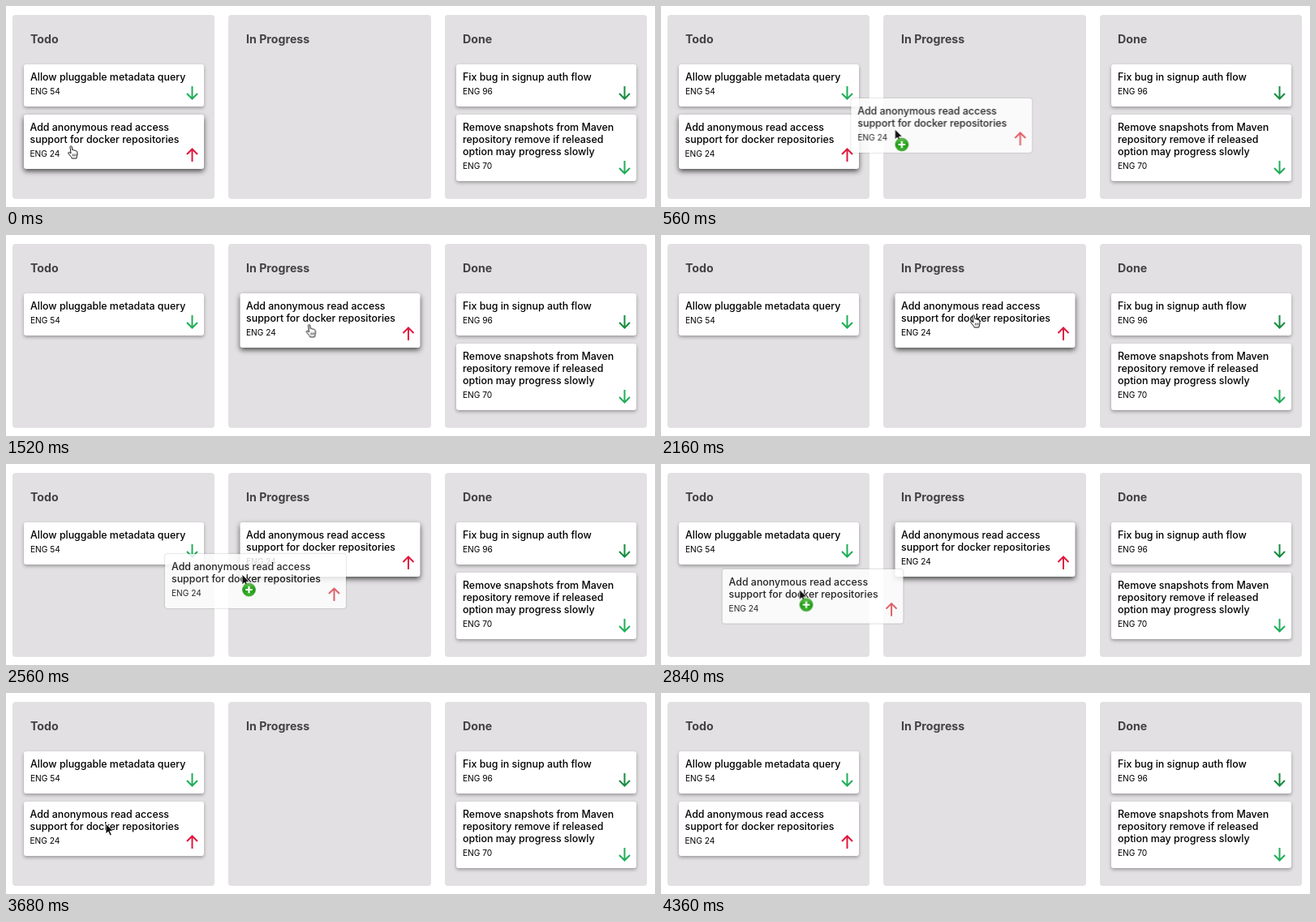
Recreate the animation shown at these times as an HTML page. Size 800 by 248 pixels, loop 4.4 s.

```html
<!DOCTYPE html>
<html lang="en">
<head>
<meta charset="utf-8">
<title>Task board</title>
<style>
html, body { margin: 0; width: 100%; height: 100%; overflow: hidden; background: #fff; }
body { position: relative; font-family: Inter, "Noto Sans", sans-serif; color: #000; }
.column, .card, .pointer, .pointer > *, h2, .card svg { position: absolute; }
.column { top: 11px; width: 249px; height: 227px; border-radius: 4px; background: #e2e0e2; }
h2 { left: 22px; top: 21.4px; margin: 0; font-size: 14.2px; line-height: 17px; font-weight: 650; color: #444244; }

.card {
  box-sizing: border-box; width: 221.5px; height: calc(37px + 15px * var(--lines));
  padding: 8px; border-radius: 3px; background: #fff; white-space: nowrap;
  font-size: 12.4px; line-height: 15px; font-weight: 500;
  box-shadow: 0 2px 4px rgba(0, 0, 0, .32);
}
.card small { display: block; margin-top: 4.3px; font-size: 10.2px; line-height: 12px; font-weight: 400; }
.card svg { right: 7px; bottom: 8px; width: 16px; height: 18px; fill: none; stroke: #1fae58; stroke-width: 2; }
.card .dark { stroke: #178c40; }
.card .high { stroke: #e0183f; }

.task, .ghost { width: 222.5px; }
.task { left: 21.5px; top: 134px; animation: place 4.4s step-end infinite, hover 4.4s step-end infinite; }
.pointer { left: 0; top: 0; animation: travel 4.4s linear infinite; }
.pointer > svg { left: 0; top: 0; overflow: visible; }
.ghost { left: 0; top: 0; box-shadow: 0 0 2px rgba(0, 0, 0, .4); animation: ghost 4.4s step-end infinite; }
.ghost .high { stroke: #e2454f; }
.hand { animation: hand 4.4s step-end infinite; }
.arrow { animation: arrow 4.4s step-end infinite; }
.plus { animation: plus 4.4s step-end infinite; }

@keyframes place {
  0%, 78.18%, 100% { transform: none; }
  19.09% { transform: translate(266.5px, -62px); }
}
@keyframes hover {
  0%, 28.18% { box-shadow: 0 3px 6px rgba(0, 0, 0, .65); }
  19.09%, 78.18%, 100% { box-shadow: 0 2px 4px rgba(0, 0, 0, .32); }
}
@keyframes travel {
  0%, 2.73% { transform: translate(76px, 172px); animation-timing-function: ease-in-out; }
  12.73% { transform: translate(288px, 152px); animation-timing-function: ease-out; }
  17.27%, 27.27% { transform: translate(338px, 142px); animation-timing-function: ease-in-out; }
  38.64%, 50.45% { transform: translate(381px, 98px); animation-timing-function: ease-in; }
  58.18% { transform: translate(291.5px, 136px); }
  63.64% { transform: translate(178px, 153px); animation-timing-function: ease-out; }
  72.73% { transform: translate(132.5px, 163px); }
  76.36%, 100% { transform: translate(123px, 161px); }
}
@keyframes ghost {
  0%, 19.09%, 78.18%, 100% { opacity: 0; }
  2.73% { opacity: .83; transform: translate(-54px, -38px); }
  50.91% { opacity: .83; transform: translate(-95px, -25px); }
}
@keyframes hand {
  0%, 28.18% { opacity: 1; }
  2.73%, 50.91%, 100% { opacity: 0; }
}
@keyframes arrow {
  0%, 28.18%, 84.55%, 100% { opacity: 0; }
  2.73%, 50.91% { opacity: 1; }
}
@keyframes plus {
  0%, 19.09%, 78.18%, 100% { opacity: 0; }
  4.55%, 52.73% { opacity: 1; }
}
</style>
</head>
<body>
<svg width="0" height="0" style="position:absolute">
  <defs>
    <path id="down" d="M8.5 1V16M2 10 8.5 16.5 15 10"/>
    <path id="up" d="M8.5 17V2M2 8 8.5 1.5 15 8"/>
    <linearGradient id="green" x2="0" y2="1">
      <stop stop-color="#63c450"/><stop offset=".5" stop-color="#209a17"/><stop offset="1" stop-color="#3db52c"/>
    </linearGradient>
  </defs>
</svg>

<div class="column" style="left:8px">
  <h2>Todo</h2>
  <div class="card" style="--lines:1;left:14px;top:61px">Allow pluggable metadata query<small>ENG 54</small><svg><use href="#down"/></svg></div>
</div>
<div class="column" style="left:274px;width:250px"><h2>In Progress</h2></div>
<div class="column" style="left:541px">
  <h2>Done</h2>
  <div class="card" style="--lines:1;left:14px;top:61px">Fix bug in signup auth flow<small>ENG 96</small><svg class="dark"><use href="#down"/></svg></div>
  <div class="card" style="--lines:3;left:14px;top:123px">Remove snapshots from Maven<br>repository remove if released<br>option may progress slowly<small>ENG 70</small><svg><use href="#down"/></svg></div>
</div>

<div class="card task" style="--lines:2">Add anonymous read access<br>support for docker repositories<small>ENG 24</small><svg class="high"><use href="#up"/></svg></div>

<div class="pointer">
  <div class="card ghost" style="--lines:2">Add anonymous read access<br>support for docker repositories<small>ENG 24</small><svg class="high"><use href="#up"/></svg></div>
  <svg class="hand" width="13" height="17" fill="#fff" stroke="#111" stroke-linejoin="round">
    <path d="M3 1.5C3.6.3 5 .6 5.2 1.8L6 6C6.3 5.3 7.6 5.3 7.9 6.3 8.5 5.7 9.7 6 9.9 7 10.8 6.6 11.7 7.2 11.8 8.2L12 11C12 13 11 14 10.8 16H5.2C4.8 14 2.5 12.5.8 9.8.2 8.6 1.6 8 2.6 8.9L4 10Z"/>
    <path d="M6.4 10.5v3M8.2 10.5v3M10 10.5v3" stroke-width=".7"/>
  </svg>
  <svg class="arrow" width="10" height="16">
    <path d="M0 0V13L3 10.2 5.2 15 7.4 14 5.2 9.3H9.2Z" fill="#111" stroke="#fff" stroke-width=".9"/>
  </svg>
  <svg class="plus" width="18" height="28">
    <circle cx="8.5" cy="19" r="8" fill="url(#green)" stroke="#2a8a20" stroke-width=".6"/>
    <path d="M8.5 14.7V23.3M4.2 19H12.8" stroke="#fff" stroke-width="2.2"/>
  </svg>
</div>
</body>
</html>
```
